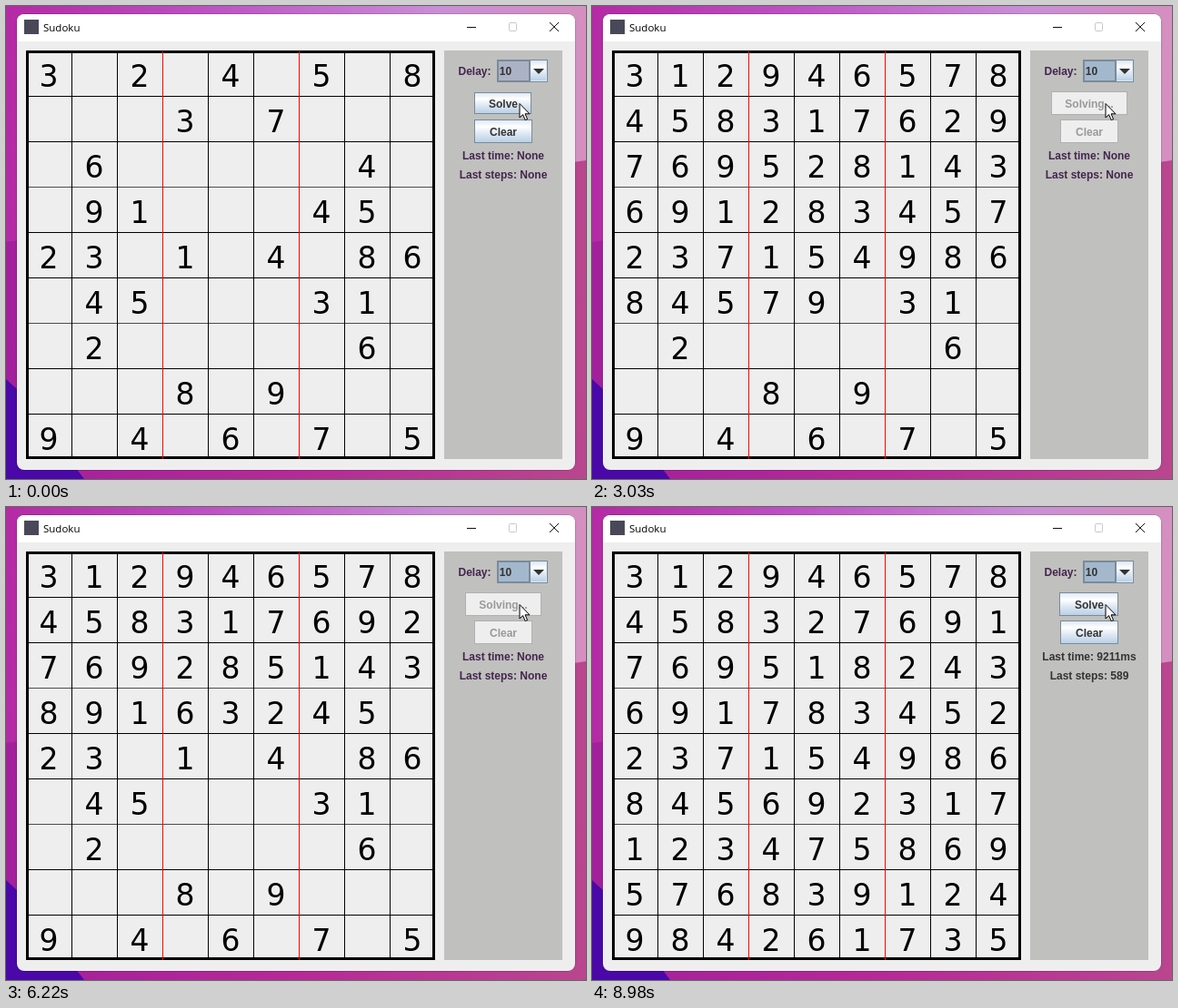
These frames come from a looping animation (638 by 521 pixels, 9850 ms). An HTML page:

```html
<!DOCTYPE html>
<html lang="en">
<head>
<meta charset="utf-8">
<title>Sudoku</title>
<style>
html, body { margin: 0; width: 100%; height: 100%; overflow: hidden; }
svg { display: block; }
.crisp { shape-rendering: crispEdges; }
#cells { font: 33px "DejaVu Sans", Verdana, sans-serif; text-anchor: middle; }
#side { font: bold 12px "Liberation Sans", Arial, sans-serif; text-anchor: middle; fill: #333; }
.plum { fill: #43254d; }
</style>
</head>
<body>
<svg width="638" height="521" viewBox="0 0 638 521">
  <defs>
    <linearGradient id="sky">
      <stop offset="0" stop-color="#b42aa4"/>
      <stop offset=".35" stop-color="#bd52c4"/>
      <stop offset=".75" stop-color="#c98fd6"/>
      <stop offset="1" stop-color="#d58fc0"/>
    </linearGradient>
    <linearGradient id="low">
      <stop offset="0" stop-color="#a2209c"/>
      <stop offset=".5" stop-color="#b52a96"/>
      <stop offset="1" stop-color="#b9468f"/>
    </linearGradient>
    <linearGradient id="steel" x2="0" y2="1">
      <stop offset="0" stop-color="#dde8f3"/>
      <stop offset=".3" stop-color="#fff"/>
      <stop offset=".6" stop-color="#dde8f3"/>
      <stop offset="1" stop-color="#b8cfe5"/>
    </linearGradient>
  </defs>

  <!-- wallpaper -->
  <path fill="url(#sky)" d="M0 0H638V521H0z"/>
  <path fill="url(#low)" d="M0 260L638 170V521H0z"/>
  <path fill="#4a08a8" d="M0 411L12 422L86 521H0z"/>

  <!-- window -->
  <rect x="11.5" y="8.5" width="615" height="503" rx="8.5" fill="#000" opacity=".3"/>
  <rect x="12" y="9" width="614" height="502" rx="8" fill="#eee"/>
  <path fill="#fff" d="M12 39V17a8 8 0 0 1 8-8H618a8 8 0 0 1 8 8V39z"/>
  <rect x="20" y="15" width="16" height="16" fill="#494858"/>
  <text x="41" y="28" font-family="'Open Sans', 'Noto Sans', sans-serif" font-size="11.5">Sudoku</text>
  <g fill="none" stroke="#111">
    <path d="M507 23.5h10M598 18l10 10M608 18l-10 10"/>
    <rect x="553.5" y="18.5" width="8" height="9" rx="1" stroke="#c8c8c8"/>
  </g>

  <g id="board" class="crisp" fill="none"></g>
  <g id="cells"></g>

  <!-- side panel -->
  <path class="crisp" fill="#c0c0be" d="M482 49h130v450h-130z"/>
  <g id="side">
    <text class="plum" x="515.5" y="76">Delay:</text>
    <g class="crisp" stroke="#7a8a99">
      <rect x="540.5" y="59.5" width="55" height="24" fill="#eee"/>
      <rect id="pick" x="541.5" y="60.5" width="34" height="22"/>
      <rect x="576.5" y="60.5" width="18" height="22" fill="url(#steel)" stroke="#dbe6f1"/>
      <path d="M576.5 60v23"/>
    </g>
    <path d="M580 69h12l-6 6z"/>
    <text x="549.5" y="76">10</text>
    <rect id="solveBox" class="crisp"/>
    <text id="solve" x="547" y="112"></text>
    <rect id="clearBox" class="crisp"/>
    <text id="clear" x="547" y="143">Clear</text>
    <text id="time" x="547" y="169"></text>
    <text id="steps" x="547" y="190"></text>
  </g>
  <path fill="#fff" stroke="#000" d="M565 107.5V123l3.6-3.4 2.6 6 2.4-1-2.6-5.8H576z"/>
</svg>
<script>
const LOOP = 9850, START = 390, DONE = 8980, TICK = 30;
const puzzle = [
  '3.2.4.5.8', '...3.7...', '.6.....4.',
  '.91...45.', '23.1.4.86', '.45...31.',
  '.2.....6.', '...8.9...', '9.4.6.7.5'].join('');
const $ = id => document.getElementById(id);
const set = (el, attrs) => { for (const k in attrs) el.setAttribute(k, attrs[k]); };

// Plain backtracking; every placed digit adds a state to the history.
const grid = [...puzzle], history = [puzzle];
const fits = (at, digit) => {
  const row = at / 9 | 0, col = at % 9;
  const corner = row - row % 3, left = col - col % 3;
  for (let i = 0; i < 9; i++) {
    const box = (corner + (i / 3 | 0)) * 9 + left + i % 3;
    if ([row * 9 + i, i * 9 + col, box].some(p => grid[p] === digit)) return false;
  }
  return true;
};
function search(at) {
  while (at < 81 && grid[at] !== '.') at++;
  if (at === 81) return true;
  for (const digit of '123456789') {
    if (!fits(at, digit)) continue;
    grid[at] = digit;
    history.push(grid.join(''));
    if (search(at + 1)) return true;
    grid[at] = '.';
  }
  return false;
}
search(0);

// Pace of the search: when the solver reaches a given partial filling.
const reach = filled => {
  const prefix = '312946578' + filled.replace(/ /g, '');
  return history.indexOf(prefix + puzzle.slice(prefix.length));
};
const pace = [
  [START, 0],
  [1470, reach('458317629 769285143 691738')],
  [3030, reach('458317629 769528143 691283457 237154986 84579')],
  [4950, reach('458317629 769582143 89167')],
  [6220, reach('458317692 769285143 891632')],
  [7230, reach('458317692 7695821')],
  [7290, reach('458317692 7695821')],
  [DONE, history.length - 1]];

function stateAt(t) {
  if (t < START) return puzzle;
  if (t >= DONE) return history[history.length - 1];
  const i = pace.findIndex(p => p[0] > t);
  const [t0, n0] = pace[i - 1], [t1, n1] = pace[i];
  const passed = Math.floor((t - t0) / TICK) * TICK;
  return history[Math.round(n0 + (n1 - n0) * passed / (t1 - t0))];
}

// Board lines and cells
let lines = '';
for (let i = 1; i < 9; i++) {
  const y = 49.5 + 50 * i;
  lines += `<path stroke="${i % 3 ? '#000' : '#4c4c4c'}" d="M22 ${y}H472"/>`;
}
lines += '<rect x="23.5" y="50.5" width="447" height="447" stroke="#000" stroke-width="3"/>';
for (let i = 1; i < 9; i++) {
  const x = 22.5 + 50 * i;
  lines += `<path stroke="${i % 3 ? '#000' : '#f00'}" d="M${x} 50V499"/>`;
}
$('board').innerHTML = lines;
$('cells').innerHTML = [...puzzle].map((_, i) =>
  `<text x="${47 + i % 9 * 50}" y="${89 + (i / 9 | 0) * 50}"></text>`).join('');
const cells = [...$('cells').children];

function button(box, label, x, y, w, h, enabled) {
  set(box, {
    x: x + .5, y: y + .5, width: w - 1, height: h - 1,
    fill: enabled ? 'url(#steel)' : '#eee', stroke: enabled ? '#7a8a99' : '#b0b0b0'
  });
  set(label, { fill: enabled ? '#333' : '#999' });
}

function showPanel(phase) {
  const idle = phase !== 1, done = phase === 2;
  set($('pick'), { fill: phase ? '#a3b8cc' : '#abb2c6' });
  $('solve').textContent = idle ? 'Solve' : 'Solving...';
  if (!idle) button($('solveBox'), $('solve'), 505, 94, 84, 26, false);
  else if (done) button($('solveBox'), $('solve'), 514, 94, 65, 26, true);
  else button($('solveBox'), $('solve'), 515, 95, 63, 24, true);
  button($('clearBox'), $('clear'), 515, 125, 64, 26, idle);
  $('time').textContent = 'Last time: ' + (done ? '9211ms' : 'None');
  $('steps').textContent = 'Last steps: ' + (done ? '589' : 'None');
  for (const id of ['time', 'steps']) $(id).classList.toggle('plum', !done);
}

let shownPhase = -1, shownState = '';
function draw() {
  const t = performance.now() % LOOP;
  const phase = t < START ? 0 : t < DONE ? 1 : 2;
  if (phase !== shownPhase) showPanel(shownPhase = phase);
  const state = stateAt(t);
  if (state !== shownState) {
    cells.forEach((cell, i) => {
      if (state[i] !== shownState[i]) cell.textContent = state[i] === '.' ? '' : state[i];
    });
    shownState = state;
  }
  requestAnimationFrame(draw);
}
draw();
</script>
</body>
</html>
```
